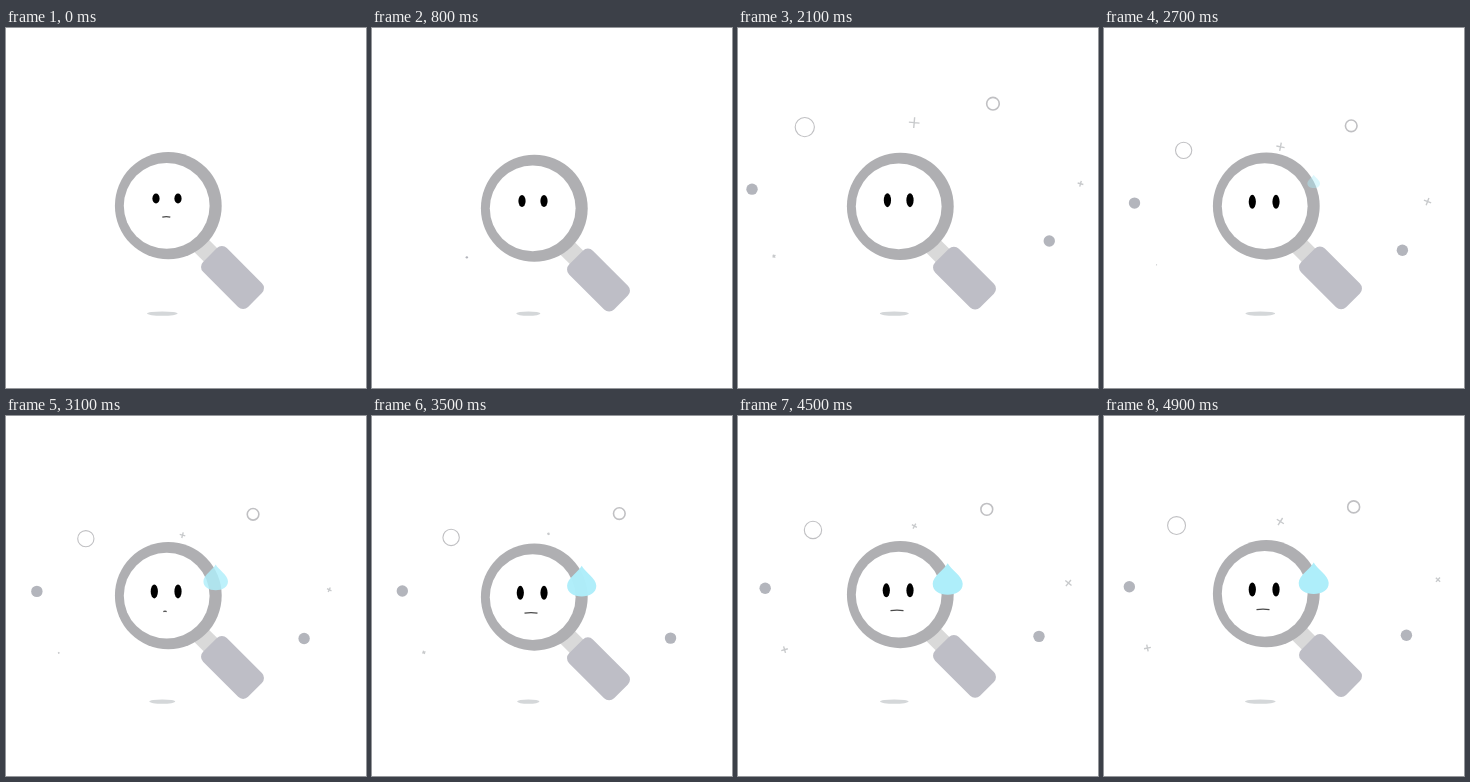
These frames come from a looping animation (360x360 px, 5 s). An HTML page with a canvas:

```html
<!DOCTYPE html>
<html lang="en">
<head>
<meta charset="utf-8">
<title>Magnifying glass</title>
<style>
  html, body { margin: 0; width: 100%; height: 100%; overflow: hidden; background: #fff; }
  canvas { display: block; width: 100vw; height: 100vh; }
</style>
</head>
<body>
<canvas width="360" height="360"></canvas>
<script>
const LOOP = 5000, STEP = 100;
const ctx = document.querySelector('canvas').getContext('2d');

const ramp = (t, a, b) => Math.min(1, Math.max(0, (t - a) / (b - a)));
const ease = u => (1 - Math.cos(Math.PI * u)) / 2;
const grow = (t, start) => 1 - (1 - ramp(t, start, 1600)) ** 2;

// Two ways of travelling: burst out until `turn`, then ease back in
const far = { turn: 1700, outer: -.5, speed: .0061 };
const near = { turn: 1600, outer: 0, speed: .0042 };

// Each particle moves on the line through `from` (0) and `to` (1)
const rings = [
  { move: near, from: [59, 85], to: [80, 123], r: 10.5, shrink: 2.4, line: 1.1 },
  { move: far, from: [254.5, 77], to: [247, 98.5], r: 6.3, shrink: .5, line: 1.6 }
];
const dots = [
  { move: far, from: [15, 162], to: [31, 175.5] },
  { move: far, from: [310.5, 213.5], to: [298, 222.5] }
];
const sparks = [
  { move: near, from: [26, 223], to: [53, 237], turn: 45, size: 3.5, dip: 2800, period: 4000 },
  { move: near, from: [176, 80], to: [176.5, 119.5], turn: 0, size: 5.5, dip: 3800, period: 4000 },
  { move: near, from: [354, 145], to: [323, 174], turn: 10, size: 4, dip: 3500, period: 1900 }
];

function travel({ turn, outer, speed }, t) {
  if (t < turn) return outer + (turn - t) * speed;
  const inward = (1 - outer) * ease(ramp(t, turn, 2800));
  return outer + inward - 1.5 * ease(ramp(t, 2800, 9300));
}

function place(p, t) {
  const q = travel(p.move, t);
  return p.from.map((a, i) => a + (p.to[i] - a) * q);
}

function ellipse(x, y, rx, ry, color) {
  ctx.fillStyle = color;
  ctx.beginPath();
  ctx.ellipse(x, y, rx, ry, 0, 0, Math.PI * 2);
  ctx.fill();
}

function particles(t) {
  ctx.strokeStyle = '#c0c0c3';
  for (const p of rings) {
    const q = Math.min(1, Math.max(0, travel(p.move, t)));
    ctx.lineWidth = p.line;
    ctx.beginPath();
    ctx.arc(...place(p, t), (p.r - p.shrink * q) * grow(t, 850), 0, Math.PI * 2);
    ctx.stroke();
  }
  for (const p of dots) {
    const r = 5.7 * grow(t, 700);
    ellipse(...place(p, t), r, r, '#b3b5bc');
  }
  ctx.strokeStyle = '#c8cacc';
  ctx.lineWidth = 1.4;
  for (const p of sparks) {
    const s = p.size * grow(t, 850) * Math.abs(Math.sin(Math.PI * (t - p.dip) / p.period));
    ctx.save();
    ctx.translate(...place(p, t));
    ctx.rotate((p.turn + Math.max(0, t - 1600) / 100) * Math.PI / 180);
    ctx.beginPath();
    ctx.moveTo(-s, 0); ctx.lineTo(s, 0);
    ctx.moveTo(0, -s); ctx.lineTo(0, s);
    ctx.stroke();
    ctx.restore();
  }
}

function handle() {
  ctx.save();
  ctx.translate(226.5, 249.5);
  ctx.rotate(Math.PI / 4);
  ctx.fillStyle = '#d9d9d9';
  ctx.fillRect(-54, -10, 26, 19);
  ctx.fillStyle = '#bebec6';
  ctx.beginPath();
  ctx.roundRect(-31.8, -16.8, 63.6, 33.6, 7);
  ctx.fill();
  ctx.restore();
}

function mouth(x, y, w) {
  if (w <= 0) return;
  ctx.strokeStyle = '#4a4a4a';
  ctx.lineWidth = 1.3;
  ctx.beginPath();
  ctx.moveTo(x - w, y + .5);
  ctx.quadraticCurveTo(x, y - .5, x + w, y + .5);
  ctx.stroke();
}

function face(t) {
  const worry = ramp(t, 1900, 2500);
  const ry = 5 + 2 * ramp(t, 0, 1600), y = 170.5 + 3 * worry;
  ellipse(150 - 1.7 * worry, y, 3.6, ry, '#000');
  ellipse(172, y, 3.6, ry, '#000');
  mouth(160.3, 188.7, 4 * (1 - ramp(t, 400, 700)));
  mouth(159, 193.2, 6.5 * ramp(t, 3000, 3400));
}

function sweat(t) {
  const s = 1 - (1 - ramp(t, 2450, 3950)) ** 3;
  ctx.save();
  ctx.globalAlpha = s;
  ctx.translate(209.7, 146.5);
  ctx.scale(s, s);
  ctx.fillStyle = '#aeeefa';
  ctx.beginPath();
  ctx.moveTo(0, 0);
  ctx.bezierCurveTo(3, 6, 15, 13, 15, 20.5);
  ctx.bezierCurveTo(15, 28, 8, 31.5, 0, 31.5);
  ctx.bezierCurveTo(-8, 31.5, -15, 28, -15, 20.5);
  ctx.bezierCurveTo(-15, 13, -3, 6, 0, 0);
  ctx.fill();
  ctx.restore();
}

function draw(t) {
  const bob = 3.5 * ease(Math.min(t, 4900) / 1225);
  ctx.fillStyle = '#fff';
  ctx.fillRect(0, 0, 360, 360);
  ellipse(156.3, 285.6, 15.2 - 1.2 * bob, 2.2, '#d4d7d9');
  if (t >= 800) particles(t);
  ctx.save();
  ctx.translate(0, bob);
  handle();
  ellipse(162.3, 177.7, 53.4, 53.6, '#afafb2');
  ellipse(160.7, 177.8, 42.9, 42.9, '#fff');
  face(t);
  sweat(t);
  ctx.restore();
}

const start = performance.now();
function tick() {
  const t = (performance.now() - start) % LOOP;
  draw(Math.floor(t / STEP) * STEP);
  requestAnimationFrame(tick);
}
tick();
</script>
</body>
</html>
```
